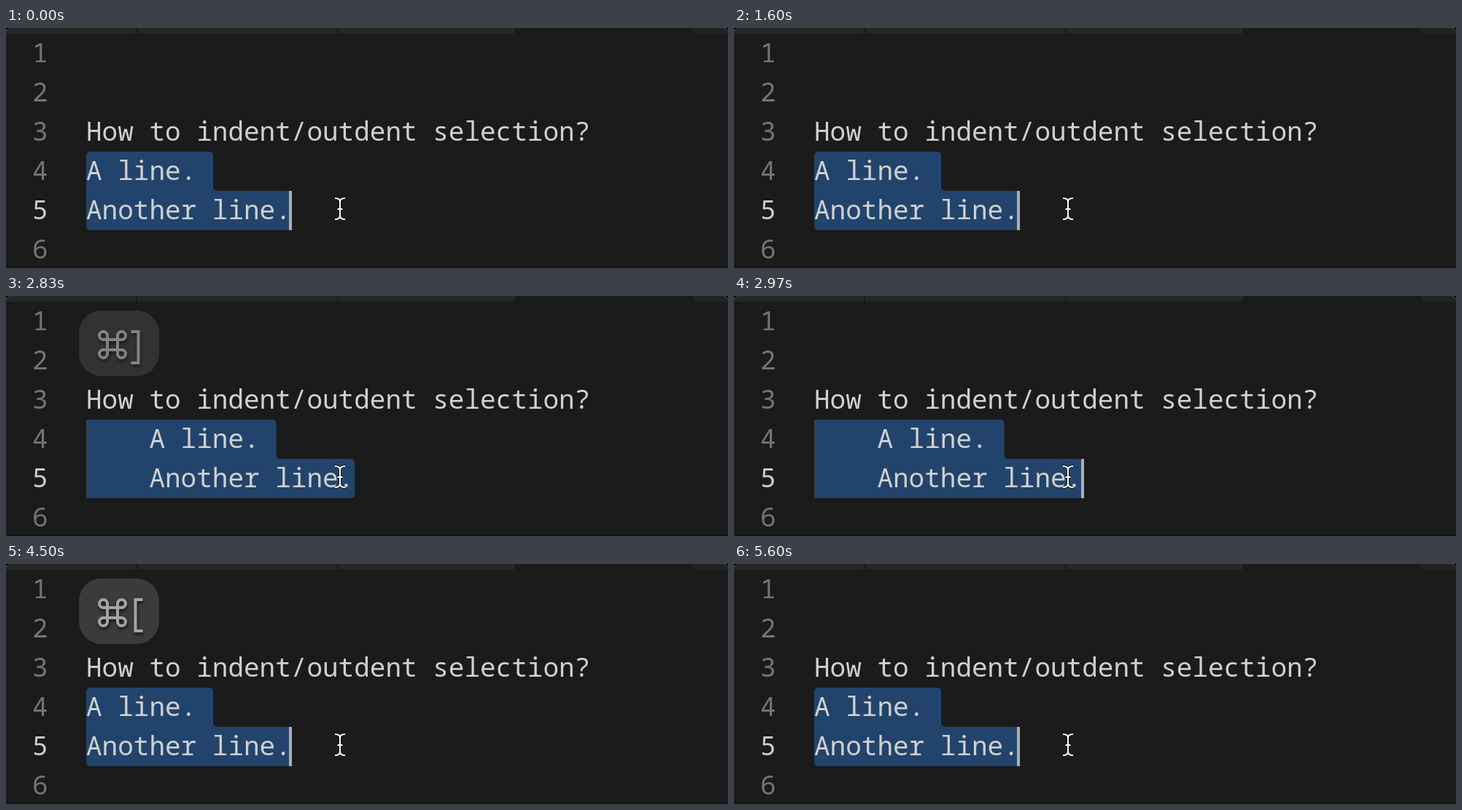
These frames come from a looping animation (990 px wide and 330 px high, 5710 ms). An HTML page with a canvas:

```html
<!DOCTYPE html>
<html lang="en">
<head>
<meta charset="utf-8">
<title>Indent and outdent</title>
<style>
html, body { margin: 0; width: 100%; height: 100%; overflow: hidden; background: #1b1b1b; }
canvas { display: block; width: 990px; height: 330px; }
</style>
</head>
<body>
<canvas id="stage" width="990" height="330"></canvas>
<script>
const ctx = document.getElementById('stage').getContext('2d');
const LOOP = 5710, INDENT = 1900, OUTDENT = 4500;
const LEFT = 110, LINE = 54, TOP = 8, SHIFT = 86.4;
const FONT = '36px "Noto Sans Mono", "DejaVu Sans Mono", monospace';

// Stepped caret fades: [start, end, steps, final opacity]
const FADES = [
  [70, 200, 4, 0], [500, 600, 4, 1],
  [1070, 1200, 4, 0], [1500, 1600, 4, 1],
  [INDENT, INDENT, 1, 1], [2400, 2530, 4, 0],
  [2900, 2970, 3, 1], [3400, 3530, 4, 0],
  [3900, 3900, 1, 1], [4400, 4530, 4, 0],
  [OUTDENT, OUTDENT, 1, 1], [5000, 5130, 4, 0],
  [5500, 5600, 4, 1]
];

function caretAlpha(t) {
  const fade = FADES.filter(f => f[0] <= t).pop();
  if (!fade) return 1;
  const [start, end, steps, goal] = fade;
  const gap = steps > 1 ? (end - start) / (steps - 1) : 1;
  const part = Math.min(steps, Math.floor((t - start) / gap + 1e-6) + 1) / steps;
  return goal ? part : 1 - part;
}

function badgeAlpha(t, shown, fadeStart) {
  if (t < shown) return 0;
  if (t < fadeStart) return 1;
  const step = Math.floor((t - fadeStart) / 35 + 1e-6);
  return Math.max(0, 0.74 * (1 - step / 4));
}

function rect(color, x, y, w, h) {
  ctx.fillStyle = color;
  ctx.fillRect(x, y, w, h);
}

function write(text, x, row, color) {
  ctx.fillStyle = color;
  ctx.fillText(text, x, TOP + row * LINE - 15);
}

function drawTabs() {
  rect('#262626', 0, 0, 697, 8);
  rect('#222222', 942, 0, 48, 8);
  rect('#1b1b1b', 178, 0, 2, 8);
  rect('#1b1b1b', 454, 0, 2, 8);
  rect('#141414', 0, 328, 990, 2);
  for (const [x, dir] of [[0, 1], [990, -1]]) {
    ctx.beginPath();
    ctx.moveTo(x, 0);
    ctx.lineTo(x + 5 * dir, 0);
    ctx.lineTo(x, 4);
    ctx.fillStyle = '#000';
    ctx.fill();
    ctx.beginPath();
    ctx.moveTo(x + 5 * dir, 0);
    ctx.lineTo(x, 4);
    ctx.strokeStyle = '#5c5c5c';
    ctx.lineWidth = 1;
    ctx.stroke();
  }
}

function drawSelection(shift) {
  const a = 284 + shift, b = 391.5 + shift, r = 5;
  ctx.beginPath();
  ctx.moveTo(LEFT, 224);
  ctx.arcTo(LEFT, 170, a, 170, r);
  ctx.arcTo(a, 170, a, 224, r);
  ctx.arcTo(a, 224, b, 224, r);
  ctx.arcTo(b, 224, b, 278, r);
  ctx.arcTo(b, 278, LEFT, 278, r);
  ctx.arcTo(LEFT, 278, LEFT, 224, r);
  ctx.closePath();
  ctx.fillStyle = '#22446c';
  ctx.fill();
  if (shift) rect('#404040', LEFT, 170, 2, 108);
}

function commandPath(x, y) {
  const s = 7, c = 12.5, r = 5.5;
  for (const v of [-s, s]) {
    ctx.moveTo(x + v, y - c);
    ctx.lineTo(x + v, y + c);
    ctx.moveTo(x - c, y + v);
    ctx.lineTo(x + c, y + v);
  }
  for (const i of [-1, 1]) for (const j of [-1, 1]) {
    const cx = x + i * c, cy = y + j * c;
    ctx.moveTo(cx - i * r, cy);
    ctx.arc(cx, cy, r, i < 0 ? 0 : Math.PI, j < 0 ? Math.PI / 2 : -Math.PI / 2, i * j > 0);
  }
}

function bracketPath(x, dir) {
  ctx.moveTo(x + 10 * dir, 49);
  ctx.lineTo(x, 49);
  ctx.lineTo(x, 92);
  ctx.lineTo(x + 10 * dir, 92);
}

function drawBadge(alpha, opening) {
  if (alpha <= 0) return;
  ctx.save();
  ctx.globalAlpha = alpha;
  ctx.beginPath();
  ctx.roundRect(100, 20, 110, 90, 31);
  ctx.fillStyle = '#3b3b3b';
  ctx.fill();
  ctx.beginPath();
  commandPath(146, 67);
  if (opening) bracketPath(177.5, 1);
  else bracketPath(181.5, -1);
  ctx.strokeStyle = '#a4a4a4';
  ctx.lineWidth = 4;
  ctx.shadowColor = 'rgba(0,0,0,.65)';
  ctx.shadowBlur = 4;
  ctx.shadowOffsetX = 1;
  ctx.shadowOffsetY = 3;
  ctx.stroke();
  ctx.restore();
}

function drawPointer() {
  ctx.beginPath();
  for (const [y, end] of [[239, 234], [258, 263]]) {
    for (const x of [451, 465]) {
      ctx.moveTo(x, end);
      ctx.quadraticCurveTo(458, end, 458, y);
    }
  }
  ctx.moveTo(458, 239);
  ctx.lineTo(458, 258);
  ctx.moveTo(454.5, 249);
  ctx.lineTo(461.5, 249);
  ctx.strokeStyle = '#111';
  ctx.lineWidth = 4;
  ctx.stroke();
  ctx.strokeStyle = '#fff';
  ctx.lineWidth = 2;
  ctx.stroke();
}

function draw(t) {
  const shift = t >= INDENT && t < OUTDENT ? SHIFT : 0;
  rect('#1b1b1b', 0, 0, 990, 330);
  drawTabs();
  drawSelection(shift);
  ctx.font = FONT;
  for (let n = 1; n <= 6; n++) write(String(n), 36, n, n === 5 ? '#cccccc' : '#747474');
  write('How to indent/outdent selection?', LEFT, 3, '#d0d0d0');
  write('A line.', LEFT + shift, 4, '#d0d0d0');
  write('Another line.', LEFT + shift, 5, '#d0d0d0');
  ctx.globalAlpha = caretAlpha(t);
  rect('#aeafad', shift ? 476 : 388, 224, 4, 54);
  ctx.globalAlpha = 1;
  drawPointer();
  drawBadge(badgeAlpha(t, INDENT, 2830), false);
  drawBadge(badgeAlpha(t, OUTDENT, 5430), true);
}

const begin = performance.now();
function tick() {
  draw((performance.now() - begin) % LOOP);
  requestAnimationFrame(tick);
}
tick();
</script>
</body>
</html>
```
